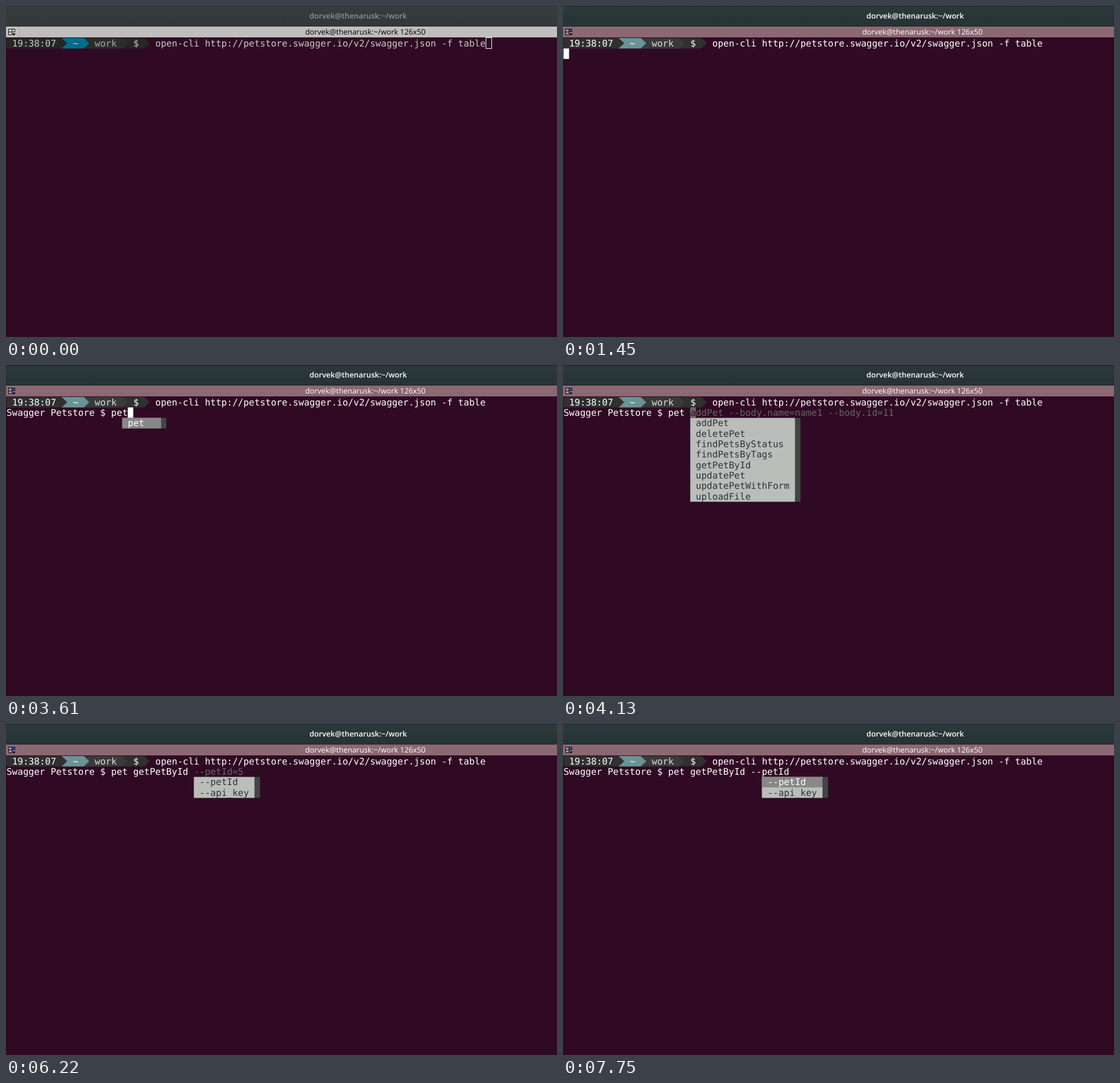
An HTML page for the animation above (8000 ms loop, 966 by 580 pixels).

```html
<!DOCTYPE html>
<html lang="en">
<head>
<meta charset="utf-8">
<title>Terminal session</title>
<style>
  html, body { margin: 0; width: 100%; height: 100%; overflow: hidden; background: #300a24; }
  svg { display: block; width: 966px; height: 580px; }
  text { white-space: pre; text-rendering: geometricPrecision; }
  .mono { font: 16.045px "DejaVu Sans Mono", monospace; }
  .header { font: 600 13.3px "Open Sans", "Noto Sans", sans-serif; text-anchor: middle; }
  .title { font: 13.2px "Open Sans", "Noto Sans", sans-serif; text-anchor: middle; }
</style>
</head>
<body>
<svg id="stage" viewBox="0 0 966 580"></svg>
<script>
const LOOP = 8000;
const CELL = 9.66, ROW = 18.354, LEFT = 0.966, TOP = 56.03;
const BACK = '#300a24';
const HOST = 'dorvek@thenarusk:~/work';
const COMMAND = 'open-cli http://petstore.swagger.io/v2/swagger.json -f table';
const PROMPT = 'Swagger Petstore $ ';
const PET_ACTIONS = ['addPet', 'deletePet', 'findPetsByStatus', 'findPetsByTags',
  'getPetById', 'updatePet', 'updatePetWithForm', 'uploadFile'];
const OPTIONS = ['--petId', '--api_key'];
const HISTORY = 'pet addPet --body.name=name1 --body.id=11';
const LOOKUP = 'pet getPetById --petId=5';

// Each step changes only the listed properties of the running state.
const steps = [
  { at: 0, active: false, focused: false, mouse: false, entered: false, prompt: '',
    input: '', history: '', menu: [], menuCol: 0, selected: -1, cursor: true },
  { at: 630, mouse: true },
  { at: 690, focused: true },
  { at: 810, active: true },
  { at: 1310, entered: true, mouse: false },
  { at: 1980, cursor: false },
  { at: 2410, prompt: PROMPT },
  { at: 2570, cursor: true },
  { at: 3180, input: 'p', history: HISTORY, menu: ['pet'], menuCol: 20 },
  { at: 3330, input: 'pe', menuCol: 21 },
  { at: 3610, input: 'pet', history: '', selected: 0 },
  { at: 4130, input: 'pet ', history: HISTORY, menu: PET_ACTIONS, menuCol: 23, selected: -1 },
  { at: 4630, input: 'pet g', history: LOOKUP, menu: ['getPetById'], menuCol: 24 },
  { at: 4910, input: 'pet ge', menuCol: 25 },
  { at: 5100, input: 'pet getPetById', history: '', selected: 0 },
  { at: 5650, input: 'pet getPetById ', history: LOOKUP, menu: OPTIONS, menuCol: 34, selected: -1 },
  { at: 6220, cursor: false },
  { at: 6400, input: 'pet getPetById -', history: '', menu: [], cursor: true },
  { at: 6460, history: LOOKUP },
  { at: 6610, input: 'pet getPetById --', menu: OPTIONS, menuCol: 36 },
  { at: 7200, input: 'pet getPetById --petId', history: '', selected: 0 },
  { at: 7750, cursor: false }
];
const states = [];
steps.reduce((last, step) => {
  const state = { ...last, ...step };
  states.push(state);
  return state;
}, {});

const colX = col => LEFT + col * CELL;
const rowY = row => TOP + row * ROW;
const rect = (x, y, w, h, fill) => `<rect x="${x}" y="${y}" width="${w}" height="${h}" fill="${fill}"/>`;
const path = (d, fill, extra = '') => `<path d="${d}" fill="${fill}" ${extra}/>`;
const label = (cls, x, y, fill, str) => `<text class="${cls}" x="${x}" y="${y}" fill="${fill}">${str}</text>`;
const mono = (col, row, str, fill) => label('mono', colX(col), rowY(row) + 14.5, fill, str);
const cells = (col, row, cols, rows, fill) => rect(colX(col), rowY(row), cols * CELL, rows * ROW, fill);
const arrow = (col, fill) =>
  path(`M${colX(col) - 0.5} ${TOP}h.5l${CELL} ${ROW / 2}l${-CELL} ${ROW / 2}h-.5z`, fill);

function header({ active, focused }) {
  const [top, bottom, ink] = active ? ['#2c383a', '#263335', '#ffffff'] : ['#373d3f', '#32383a', '#8f9394'];
  const edge = active ? '#1b2426' : '#25292b';
  const bar = focused ? '#8c6872' : '#c0bebc';
  const titleInk = focused ? '#ffffff' : '#000000';
  const pane = focused ? '#1c50d8' : '#d4d2d0';
  return `<defs><linearGradient id="bar" x2="0" y2="1"><stop stop-color="${top}"/>
      <stop offset="1" stop-color="${bottom}"/></linearGradient></defs>`
    + rect(0, 0, 966, 36, 'url(#bar)')
    + rect(0, 0, 966, 1, edge) + rect(0, 35, 966, 1, edge)
    + label('header', 617.5, 22, ink, HOST)
    + rect(0, 36, 966, 19, bar)
    + (focused ? '' : rect(23, 36, 1, 19, '#a5a3a1'))
    + rect(4.5, 40.5, 11, 10, focused ? '#a58b92' : '#d4d2d0')
    + rect(10.5, 40.5, 5, 5, pane)
    + path('M4.5 40.5h11v5h-11zM4.5 45.5v5h6v-10', 'none', 'stroke="#0a0a0a"')
    + path('M10.5 48h6.5l-3.2 4z', '#0a0a0a')
    + label('title', 630, 50.3, titleInk, HOST + ' 126x50');
}

function shellLine({ focused }) {
  const [dark, blue, grey, ink, soft] = focused
    ? ['#303030', '#6b9294', '#3a3a3a', '#ffffff', '#dcdcdc']
    : ['#262626', '#006c8c', '#2d2d2d', '#c8c8c8', '#a6a6a6'];
  return cells(0, 0, 25, 1, dark) + cells(10, 0, 4, 1, blue) + cells(14, 0, 7, 1, grey)
    + arrow(10, dark) + arrow(14, blue) + arrow(21, grey) + arrow(25, dark)
    + mono(1, 0, '19:38:07', ink) + mono(12, 0, '~', ink)
    + mono(16, 0, 'work', soft) + mono(23, 0, '$', ink)
    + mono(27, 0, COMMAND, ink);
}

function inputLine({ entered, focused, prompt, input, history, cursor }) {
  const line = prompt + input;
  const ghost = history.slice(input.length);
  const col = entered ? line.length : 27 + COMMAND.length;
  const row = entered ? 1 : 0;
  let out = mono(0, 1, line, '#ffffff') + mono(col, row, ghost, '#666666');
  if (!cursor) return out;
  if (!focused) {
    return out + `<rect x="${Math.round(colX(col)) + 0.5}" y="55.5" width="10" height="19" fill="none" stroke="#fff"/>`;
  }
  out += cells(col, row, 1, 1, ghost ? '#6a6a6a' : '#ffffff');
  return ghost ? out + mono(col, row, ghost[0], BACK) : out;
}

function menuBox({ menu, menuCol, selected }) {
  if (!menu.length) return '';
  const width = Math.max(7, ...menu.map(item => item.length + 2));
  const chosen = selected < 0 ? '' : cells(menuCol, 2 + selected, width, 1, '#888888');
  const items = menu.map((item, i) =>
    mono(menuCol + 1, 2 + i, item, i === selected ? '#ffffff' : '#2e3436'));
  return cells(menuCol, 2, width + 1, menu.length, '#444444')
    + cells(menuCol, 2, width, menu.length, '#bbbdbb') + chosen + items.join('');
}

function pointer({ mouse }) {
  if (!mouse) return '';
  const beam = 'M919.5 422.5h1.5l1 1l1-1h1.5M922 423.5v14M919.5 438.5h1.5l1-1l1 1h1.5';
  return path(beam, 'none', 'stroke="#ffffff" stroke-width="3"')
    + path(beam, 'none', 'stroke="#111111" stroke-width="1"');
}

const stage = document.getElementById('stage');
let shown;

function draw() {
  const time = performance.now() % LOOP;
  const state = states.findLast(s => s.at <= time);
  if (state !== shown) {
    shown = state;
    stage.innerHTML = rect(0, 0, 966, 580, BACK)
      + [header, shellLine, inputLine, menuBox, pointer].map(part => part(state)).join('');
  }
  requestAnimationFrame(draw);
}
draw();
</script>
</body>
</html>
```
